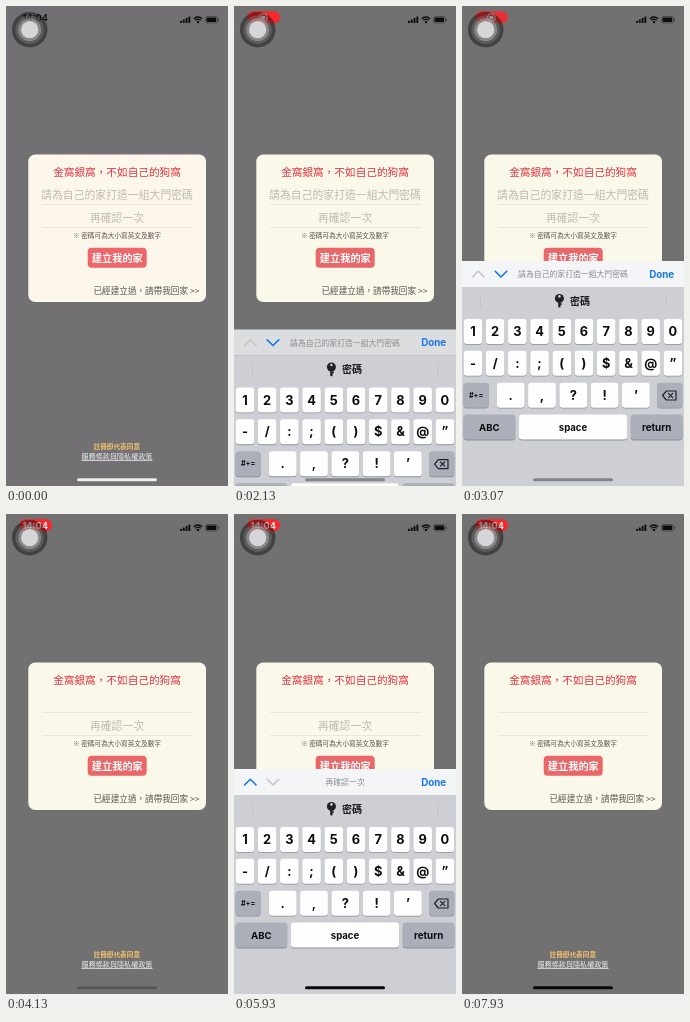
Write an HTML page with a canvas that moves like this. It is 222 by 480 pixels and loops after 8 s.

```html
<!DOCTYPE html>
<html lang="zh-Hant">
<head>
<meta charset="utf-8">
<style>
html, body { margin: 0; width: 100%; height: 100%; overflow: hidden; background: #717171; }
canvas { display: block; width: 222px; height: 480px; }
</style>
</head>
<body>
<canvas id="stage"></canvas>
<script>
const W = 222, H = 480, LOOP = 8000;
const canvas = document.getElementById('stage');
const ctx = canvas.getContext('2d');
const dpr = window.devicePixelRatio || 1;
canvas.width = W * dpr;
canvas.height = H * dpr;

const CJK = '"Noto Sans CJK TC", "Noto Sans CJK", sans-serif';
const LATIN = 'Inter, Roboto, sans-serif';
const FIRST = '請為自己的家打造一組大門密碼';
const SECOND = '再確認一次';

// Times in ms
const PILL_IN = 300, CLOCK_AT = 3500;
const SHEETS = [
  { up: 2054.5, down: 3200, first: true },
  { up: 5500, down: 6350, first: false }
];
const FIRST_FILLED = 3640, SECOND_FILLED = 6800;

function box(x, y, w, h, r, color) {
  ctx.fillStyle = color;
  ctx.beginPath();
  ctx.roundRect(x, y, w, h, r);
  ctx.fill();
}

function disc(x, y, r, color) {
  ctx.fillStyle = color;
  ctx.beginPath();
  ctx.arc(x, y, r, 0, Math.PI * 2);
  ctx.fill();
}

function stroke(points, color, width, closed) {
  ctx.strokeStyle = color;
  ctx.lineWidth = width;
  ctx.lineCap = ctx.lineJoin = 'round';
  ctx.beginPath();
  points.forEach(([x, y], i) => i ? ctx.lineTo(x, y) : ctx.moveTo(x, y));
  if (closed) ctx.closePath();
  ctx.stroke();
}

// y is the visual middle of the glyphs
function text(str, x, y, size, color, { weight = 400, font = CJK, align = 'center' } = {}) {
  ctx.font = `${weight} ${size}px ${font}`;
  ctx.textAlign = align;
  ctx.textBaseline = 'alphabetic';
  ctx.fillStyle = color;
  ctx.fillText(str, x, y + size * (font === CJK ? 0.38 : 0.36));
}

const clamp = v => Math.max(0, Math.min(1, v));

// Critically damped spring from 0 to 1
function spring(ms) {
  if (ms <= 0) return 0;
  const k = ms * 0.0316;
  return 1 - (1 + k) * Math.exp(-k);
}

function drawCard(t) {
  const warm = t < 1800;
  box(0, 0, W, H, 0, warm ? '#727073' : '#717171');
  box(22.3, 148.4, 177.7, 147.6, 7, warm ? '#fdf7eb' : '#faf8e9');
  text('金窩銀窩，不如自己的狗窩', 111, 166.4, 10.65, '#e0343f', { weight: 500 });
  if (t < FIRST_FILLED) text(FIRST, 111, 188.5, 10.85, '#bdbbb3');
  if (t < SECOND_FILLED) text(SECOND, 111, 211.5, 10.85, '#bdbbb3');
  box(36, 198, 151, 0.8, 0, '#e6e3d6');
  box(36, 221, 151, 0.8, 0, '#e6e3d6');
  text('※ 密碼可為大小寫英文及數字', 111, 229.2, 6.65, '#55534f', { weight: 500 });
  box(81.7, 241.8, 59, 19.9, 4, warm ? '#ee666a' : '#e96769');
  text('建立我的家', 111.3, 251.9, 10.2, '#fff', { weight: 700 });
  text('已經建立過，請帶我回家 >>', 193.5, 284.5, 8.6, '#57554f', { weight: 500, align: 'right' });
  text('註冊即代表同意', 110.8, 440.7, 6.65, '#f5c16e', { weight: 700 });
  text('服務條款與隱私權政策', 111, 450.7, 7.1, '#f0f0f0', { weight: 500 });
  box(75.5, 454.3, 71, 0.6, 0, '#ececec');
}

function drawSignals() {
  const ink = '#0c0c0c';
  for (let i = 0; i < 4; i++) {
    const h = 2.2 + i * 1.4;
    box(174 + i * 2.8, 17 - h, 1.9, h, 0.5, ink);
  }
  ctx.strokeStyle = ink;
  ctx.lineCap = 'butt';
  ctx.lineWidth = 1.3;
  for (const r of [6, 3.8]) {
    ctx.beginPath();
    ctx.arc(192, 17, r, -Math.PI * 0.76, -Math.PI * 0.24);
    ctx.stroke();
  }
  disc(192, 16, 1.2, ink);
  ctx.lineWidth = 0.6;
  ctx.strokeStyle = '#303030';
  ctx.beginPath();
  ctx.roundRect(199.6, 10.6, 12, 6.4, 1.8);
  ctx.stroke();
  box(200.6, 11.6, 9.6, 4.4, 1, ink);
  box(212.3, 12.7, 0.8, 2.2, 0.4, '#303030');
}

function drawClock(color, alpha) {
  ctx.globalAlpha = alpha;
  text('14:04', 29.2, 12, 9.4, color, { weight: 600, font: LATIN });
  ctx.globalAlpha = 1;
}

function drawStatus(t) {
  const shown = clamp((t - PILL_IN) / 250);
  const pulse = 0.93 + 0.07 * Math.cos((t - 4130) / 1000 * Math.PI);
  ctx.globalAlpha = shown * pulse;
  box(13.5, 5.3, 32.5, 12, 6, '#f8282d');
  ctx.globalAlpha = 1;

  if (shown < 1) drawClock('#101010', 1 - shown);
  if (t >= CLOCK_AT) {
    drawClock('#fff', pulse);
  } else if (shown > 0) {
    ctx.globalAlpha = shown;
    ctx.strokeStyle = '#fff';
    ctx.lineWidth = 0.9;
    ctx.beginPath();
    ctx.arc(29.3, 11.5, 3.9, 0, Math.PI * 2);
    ctx.stroke();
    disc(29.3, 11.5, 2.1, '#fff');
    ctx.globalAlpha = 1;
  }

  // Floating touch button, translucent over the status bar
  disc(23.7, 23.6, 17.8, 'rgba(0,0,0,0.42)');
  disc(23.7, 23.7, 14.2, 'rgba(150,150,150,0.32)');
  disc(23.7, 23.7, 11.4, 'rgba(190,190,190,0.45)');
  disc(23.7, 23.7, 8.6, '#d6d5d8');
  drawSignals();
}

function key(x, y, w, label, size = 12.8, dark = false) {
  box(x, y + 0.8, w, 25, 3, '#8d9096');
  box(x, y, w, 25, 3, dark ? '#abafb9' : '#fefefe');
  if (label) text(label, x + w / 2, y + 12.5, size, '#0c0c0c', { weight: 700, font: LATIN });
}

function drawKeyboard(first, open) {
  const blue = '#1677ea', gray = '#c2c4c8';
  box(0, 26, W, 199, 0, '#cdcfd5');
  ctx.globalAlpha = 0.4 + 0.6 * open;
  box(0, 0, W, 26, 0, '#f4f5f7');
  ctx.globalAlpha = 1;
  stroke([[10.5, 16], [16.3, 10.3], [22.1, 16]], first ? gray : blue, 1.6);
  stroke([[33.2, 10.3], [39, 16], [44.8, 10.3]], first ? blue : gray, 1.6);
  text(first ? FIRST : SECOND, 111, 13.3, 7.85, '#8b8d91');
  text('Done', 199.7, 13, 9.8, blue, { weight: 700, font: LATIN });

  // Password suggestion
  box(18, 33.5, 0.7, 13, 0, '#bbbec5');
  box(203.7, 33.5, 0.7, 13, 0, '#bbbec5');
  disc(97.4, 37.4, 4.5, '#202124');
  disc(97.4, 35.4, 1.3, '#cdcfd5');
  box(96.2, 39.8, 2.4, 6.8, 1, '#202124');
  box(97.5, 42.2, 2.4, 1.5, 0.4, '#202124');
  text('密碼', 118, 39.8, 10, '#1c1d20', { weight: 700 });

  ['1234567890', '-/:;()$&@”'].forEach((row, r) => {
    [...row].forEach((c, i) => key(1.6 + i * 22.22, 58 + r * 31.8, 18.6, c));
  });
  key(1.6, 121.8, 25, '#+=', 7.2, true);
  [...'.,?!’'].forEach((c, i) => key(34.8 + i * 31.3, 121.8, 27.8, c));
  key(195.3, 121.8, 25, '', 0, true);
  stroke([[200.6, 134.5], [204.3, 130], [214, 130], [214, 139], [204.3, 139]], '#202226', 1.2, true);
  stroke([[206.5, 132.4], [210.7, 136.6]], '#202226', 1.2);
  stroke([[210.7, 132.4], [206.5, 136.6]], '#202226', 1.2);
  key(1.6, 153.6, 51.6, 'ABC', 9.6, true);
  key(57, 153.6, 108, 'space', 9.6);
  key(168.8, 153.6, 51.6, 'return', 9.8, true);
}

function drawSheets(t) {
  for (const { up, down, first } of SHEETS) {
    const open = spring(t - up) - spring(t - down);
    if (open < 0.002) continue;
    ctx.save();
    ctx.translate(0, H - 225 * open);
    drawKeyboard(first, open);
    ctx.restore();
  }
}

function draw(t) {
  ctx.setTransform(dpr, 0, 0, dpr, 0, 0);
  drawCard(t);
  drawStatus(t);
  drawSheets(t);
  const bar = t < SHEETS[0].up ? '#ededed' : t < SHEETS[1].up ? 'rgba(60,60,62,0.5)' : '#080808';
  box(71, 472.3, 80, 3, 1.5, bar);
}

const start = performance.now();
function tick() {
  draw((performance.now() - start) % LOOP);
  requestAnimationFrame(tick);
}
tick();
</script>
</body>
</html>
```
